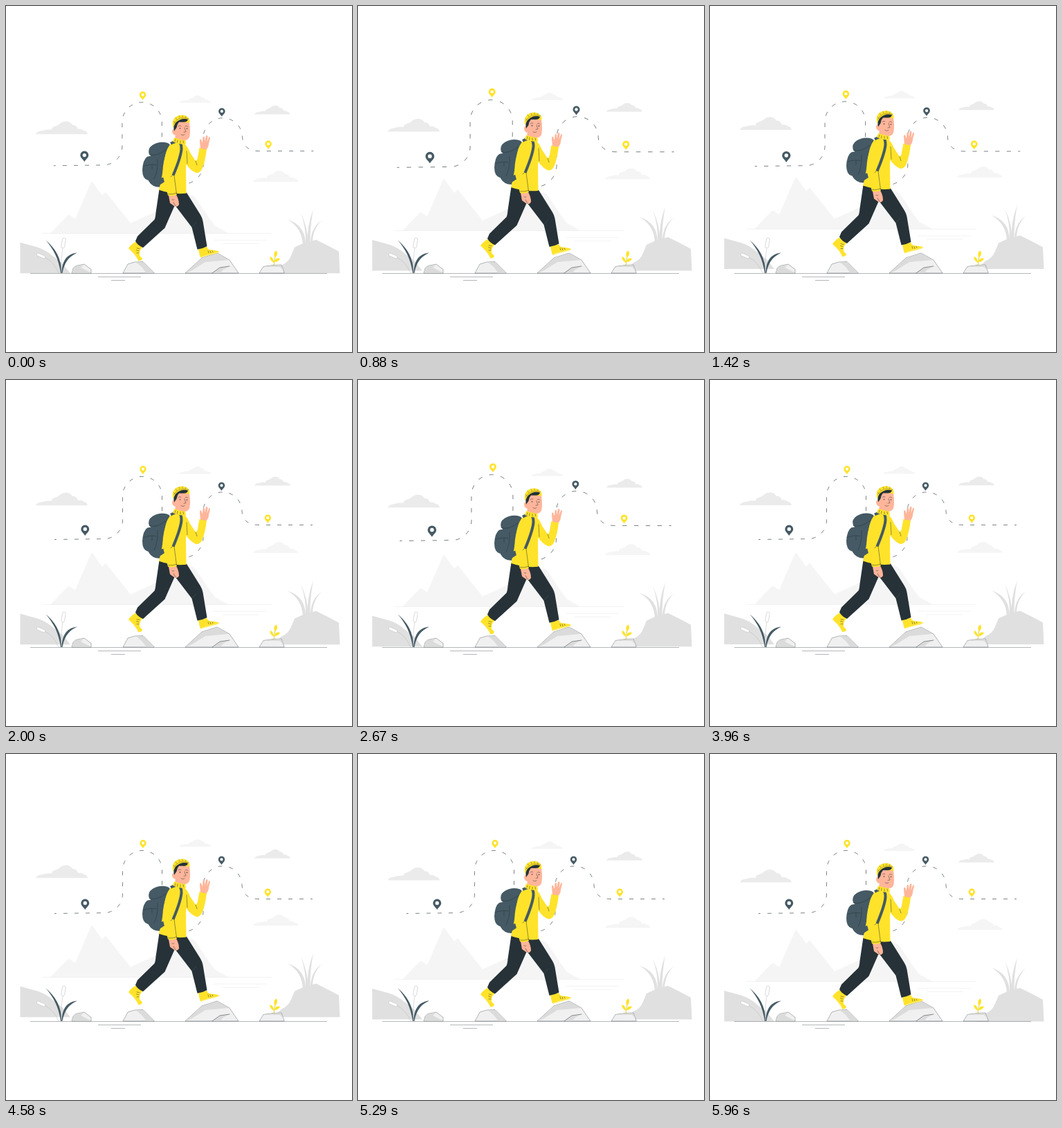
Recreate the animation shown at these times as an HTML page. Size 500 px wide and 500 px high, loop 6 s.

```html
<!DOCTYPE html>
<html lang="en">
<head>
<meta charset="utf-8">
<title>Hiker</title>
<style>
html, body { margin: 0; width: 100%; height: 100%; overflow: hidden; background: #fff; }
svg { display: block; width: 100%; height: 100%; }
path { stroke-linejoin: round; }
.y { fill: #ffe32a; }
.d { fill: #263238; }
.b { fill: #455a64; }
.s { fill: #ffb59a; }
.hill { fill: #e0e0e0; }
.far { fill: #ebebeb; }
.pale { fill: #f5f5f5; }
.rock { fill: #f0f0f0; stroke: #263238; stroke-width: .35; }
.shade { fill: #dbdbdb; }
.ink { fill: none; stroke: #263238; stroke-width: .5; stroke-linecap: round; }
.thin { fill: none; stroke: #ebebeb; stroke-width: .6; }
</style>
</head>
<body>
<svg viewBox="0 0 500 500">
  <defs>
    <path id="cloud" d="M0 18.500Q2 14 9 13.500Q16 11 23 12Q23 8 28 7Q32 6 34 4Q38 0 44 0Q49 0 53 5Q59 5 61 11Q66 10 70 13.500Q74 14 75 18.500Z"/>
    <path id="pin" fill-rule="evenodd" d="M0 0C-1.6-3-4.7-4.5-4.7-7.6A4.7 4.7 0 0 1 4.7-7.6C4.7-4.5 1.6-3 0 0ZM0-9.7A2.1 2.1 0 0 0 0-5.5A2.1 2.1 0 0 0 0-9.7Z"/>
  </defs>

  <g class="float">
    <path class="pale" d="M64 329L89 303Q91 301 94 304L100 308L123 255Q124 253 126 256L139 274L144 269L180 314L213 299L240 288L265 274Q270 272 275 279L293 306L302 318L322 329Z"/>
    <path class="thin" d="M53 328.700H384M300 338.500H377M313 343.500H366"/>
    <use href="#cloud" x="43" y="167" class="far"/>
    <use href="#cloud" transform="translate(359 144)scale(.69)" class="far"/>
    <use href="#cloud" transform="translate(250.5 129.3)scale(.61 .58)" class="pale"/>
    <use href="#cloud" transform="translate(357 238.5)scale(.87 .85)" class="pale"/>
  </g>

  <!-- Route: each half is dashed from its outer end -->
  <g id="route">
    <g fill="none" stroke="#263238" stroke-width=".6" stroke-dasharray="6 10" stroke-dashoffset="3">
      <path d="M70 230.500L141 229.600A27 27 0 0 0 168.500 203V168A28.500 28.500 0 0 1 225.500 168V220"/>
      <path d="M443 209.500H365Q343 209.500 341 190A28 28 0 0 0 285 190V229A29.800 29.800 0 0 1 225.500 229"/>
    </g>
    <use href="#pin" class="y" x="198" y="136.300"/>
    <use href="#pin" class="b" x="311.500" y="160"/>
    <use href="#pin" class="y" x="378.300" y="206.800"/>
    <use href="#pin" class="b" transform="translate(114.3 225)scale(1.26)"/>
  </g>

  <g class="float hill">
    <path d="M20.500 342L46 349Q58 353 68 362L82 373L93 386.500H20.500Z"/>
    <path d="M386 386.500L398 375Q408 371 412 361L417 349L430 343L448 338L464 346L481 355L482.500 386.500Z"/>
    <path d="M429 346Q428 321 407 309Q433 317 433 346Z"/>
    <path d="M433 346Q434 321 426 299Q437 322 436.500 346Z"/>
    <path d="M436 346Q434 320 444 294Q439 320 439.500 346Z"/>
    <path d="M440 346Q439 322 456 310Q442 324 443 346Z"/>
  </g>

  <!-- Foreground plants -->
  <path class="b" d="M79 386C76 365 69 352 57.500 338.500C71 350 80 364 80.500 386Z"/>
  <path class="b" d="M80.500 386C81 368 88 358 103 356.500C91 362 84.500 370 81.500 386Z"/>
  <g fill="#fff" stroke="#b5b8ba" stroke-width=".5">
    <path fill="none" d="M79 386Q80 362 82 350M76 386Q69 369 56 363.500"/>
    <rect x="-2.400" y="-7.300" width="4.800" height="14.600" rx="2.400" transform="translate(83 342.500)rotate(10)"/>
    <rect x="-2.100" y="-6.500" width="4.200" height="13" rx="2.100" transform="translate(50.500 361)rotate(-66)"/>
  </g>

  <!-- Rocks -->
  <path class="rock" d="M95 386L97 379L101 375.500L113 373L123 380.500V386Z"/>
  <path class="shade" d="M95.500 386L98 379L101 376L112.500 373.500L108 378L122 385V386Z"/>
  <path class="rock" d="M169 386L176 373L186 370L198 369.500L214 385.500V386Z"/>
  <path class="shade" d="M188 370.500L198 370L213.500 386H203L196 377Z"/>
  <path class="rock" d="M259 386L283 364L305 357L323 367L336 386Z"/>
  <path class="shade" d="M260 386L283 364.500L305 357.500L322 367L288 370L269 382Z"/>
  <path class="shade" d="M298 386L309 378L323 376L314 381L309 386Z"/>
  <path class="ink" d="M298 386L309 378L323 376"/>
  <path class="rock" d="M366 386L372 376.500L385 374.500L398 374L402 385V386Z"/>
  <path class="shade" d="M373 377L385 375L397.500 374.500L401 382L396 377Z"/>
  <path d="M387 375Q388 367 389 362" fill="none" stroke="#d8bd12" stroke-width=".8"/>
  <path class="y" d="M388.500 364Q385 356 391 353.500Q394 359 388.500 364ZM387 371Q381 368 381.500 362Q387 364 387 371ZM387.500 370Q390 363 396 365Q394 370 387.500 370Z"/>

  <!-- Hiker -->
  <g class="float">
    <!-- far arm -->
    <path class="s" d="M281 207L280 195Q280 192 282 193L284 198L284.500 190Q286 188 287 190V196L289 188Q291 186 291.500 189L290.500 197L293 190Q295 188 295 191L293 199Q293 205 288 209Z"/>
    <path class="y" d="M257 199Q262 202 266 212L274 224Q276 224 277 219L279.500 205Q284 208 290 207Q288 224 284 234Q281 242 275 241.500Q267 239 259 227Z"/>
    <path class="ink" d="M274 224L276 230M261 210L262 228"/>

    <!-- backpack -->
    <path class="b" d="M228 202Q216 206 209 217Q202 235 206 253Q211 262 222 262L240 256L246 205Z"/>
    <path class="b" d="M207 215Q204 206 212 201Q222 195 233 198Q239 200 237 207L229 216Q216 222 207 215Z"/>
    <path class="b" d="M204 218Q213 215 219 221V245Q216 253 205 252Q197 250 197 237Q198 222 204 218Z"/>
    <path class="ink" d="M208 215Q218 218 231 208M198 232Q208 228 217 230M219 222Q220 238 214 250M211 230V236"/>

    <!-- legs and shoes -->
    <path class="y" d="M187 341L198 348Q192 354 193 361L197 365Q196 369 191 368.500Q187 359 177 351Q178 347 187 341Z"/>
    <path class="y" d="M278 351L290 348Q292 354 300 353L307 354.500Q309 356 305 357.500L291 361L281 364Q279 358 278 351Z"/>
    <path fill="none" stroke="#fff3a0" stroke-width=".8" d="M177.500 350.500Q186 358 191 367M281 363.500L291 360L307 356"/>
    <path class="ink" d="M189 350L193 351M188.500 353L192 354M189 357L192 357M292 354L293 357M295 354L296 357M298 354L299 356"/>
    <path class="d" d="M221.500 265L261 270L281 302Q283.500 306 284.500 311L290.500 347.500Q284 351 276.500 352L268.500 320L244 288L229.500 321L198 349.500Q190 346 187 340L190 333L214.500 309Q216 306 216.500 299Z"/>
    <path d="M243 289L248 279M268.500 320L275 313" fill="none" stroke="#455a64" stroke-width=".5"/>

    <!-- torso -->
    <path class="y" d="M239 199Q250 194 259 199Q261 213 260 237L260.500 271Q241 273 221 266Q226 246 229 222Q232 205 239 199Z"/>
    <path class="b" d="M224 249L232 246L234 251L222 259Z"/>

    <!-- near arm -->
    <path class="s" d="M235 274L246 273Q250 280 250 287Q248 291 244 290L237 285Z"/>
    <path class="ink" d="M242 284L245 289M240 280Q242 281 243 280"/>
    <path class="y" d="M240 198Q249 201 249 212Q248 227 242.500 241L247 273Q240 276 234 274L227 247Q225 235 230 217Q233 203 240 198Z"/>
    <path class="ink" d="M242.500 241L246.500 272M238 247Q243 244 243 239M234.500 272Q240 273 246.500 270.500"/>
    <path d="M238 199Q254 190 253.500 207Q252.500 219 241.500 245" fill="none" stroke="#455a64" stroke-width="4"/>

    <!-- head -->
    <path class="s" d="M245 184L257 188V198Q250 200 244 195Z"/>
    <path class="y" d="M243 190.500Q251 193.500 259 193.500L260 199.500Q250 201 241 196Z"/>
    <path class="ink" d="M245 193L244 196M248 194L247.500 197.500M252 195V198M256 195L256.500 198"/>
    <path class="s" d="M244 168Q251 161 264 164Q267 176 265.500 188Q264 195 257 194Q249 193 246 187Q241 187 240 182Q240 177 244 178Z"/>
    <path class="y" d="M241 174Q239 164 247 159.500Q257 155 264 162Q266 165 265.500 169L250 167Q244 170 243 177Z"/>
    <path class="d" d="M243 181Q241 173 246 168Q254 161 263 164Q262 168.500 256 168L250 168Q247 171 246.500 176Z"/>
    <path class="ink" stroke-opacity=".7" d="M242.500 170Q250 158 264 163M242 167L244 168.500M245 161.500L247 164M250 159L251 161.500M255 158.500V160.500M260 159.500L259.500 161.500"/>
    <path class="ink" d="M249 174Q251 172 253 173.500M259 174Q261 172.500 263 174.500M258 176L260 182L257 182.500M253 186Q256 188 258 186"/>
    <circle class="d" cx="251.500" cy="177" r=".8"/>
    <circle class="d" cx="261.500" cy="177.500" r=".8"/>
  </g>

  <!-- Ground -->
  <path d="M35 386.500H464M133 391.500H195M152 396.500H172" stroke="#263238" stroke-width=".35"/>
</svg>
<script>
const LOOP = 6000, LEAD = 40;
const floaters = document.querySelectorAll('.float');
const route = document.getElementById('route');

// Linear interpolation through [time, value] points
function track(points, t) {
  const i = points.findIndex(p => p[0] > t);
  const [t0, a] = points[i - 1], [t1, b] = points[i];
  return a + (b - a) * (t - t0) / (t1 - t0);
}

const beat = [[0, 1], [600, 1.1], [1800, 1], [2400, 1], [3000, 1.1], [3600, 1], [LOOP, 1]];
const bob = [[0, 0], [1500, -6.67], [3000, 0]];

function draw() {
  const t = (performance.now() + LEAD) % LOOP;
  const y = track(bob, t % 3000);
  floaters.forEach(el => el.setAttribute('transform', `translate(0 ${y})`));
  route.setAttribute('transform',
    `translate(256.5 191.7)scale(${track(beat, t)})translate(-256.5 -191.7)`);
  requestAnimationFrame(draw);
}
draw();
</script>
</body>
</html>
```
